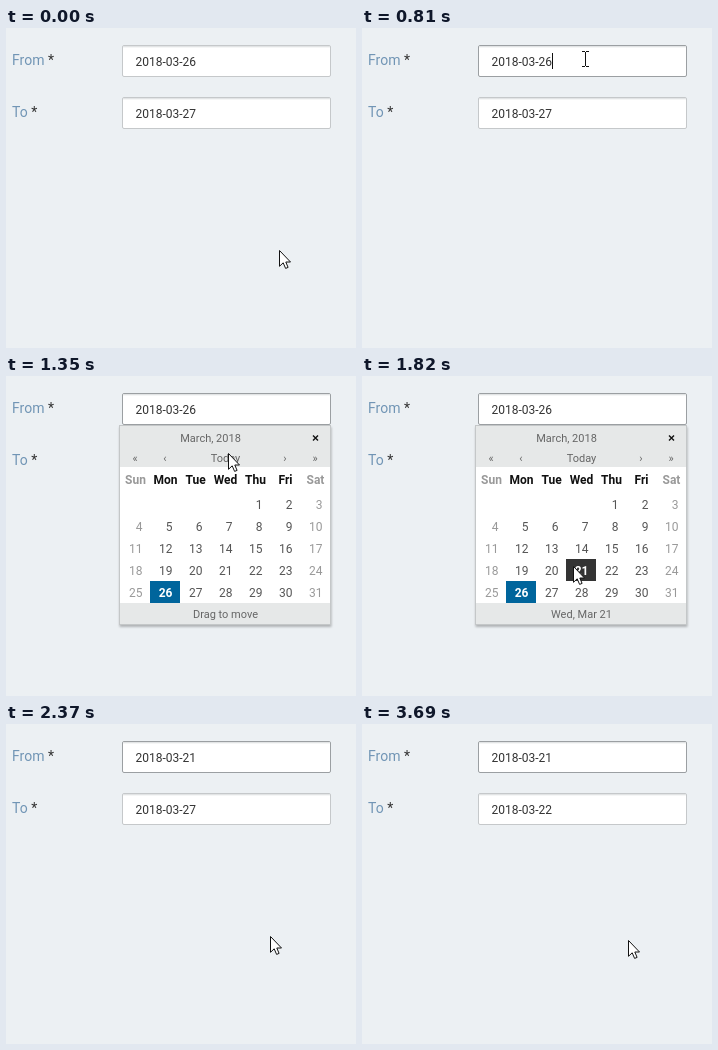
Animation of 350 by 320 pixels, one loop 5.69 s. Source, as an HTML page:

```html
<!DOCTYPE html>
<html lang="en">
<head>
<meta charset="utf-8">
<title>Date picker</title>
<style>
html, body { margin: 0; width: 100%; height: 100%; overflow: hidden; background: #ecf0f3; }
svg { display: block; }
text { font: 12px Roboto, sans-serif; fill: #333; white-space: pre; }
.label { font-size: 14px; fill: #7195b5; }
.label tspan { fill: #333; }
.small { font-size: 11px; fill: #666; }
.mid { text-anchor: middle; }
.day { text-anchor: end; fill: #555; }
.head { text-anchor: middle; font-weight: 700; fill: #111; }
.weekend { fill: #999; }
.picked { font-weight: 700; fill: #fff; }
.field { fill: #fff; stroke: #c5c8ca; }

/* every state holds until the next keyframe */
.anim { animation: 5690ms step-end infinite; }
.timed { opacity: 0; }
#pointer { animation-name: move; }
#arrow { animation-name: arrow; }
#beam { animation-name: beam; }
#from { animation-name: focus; }
#caret { animation-name: caret; }
#calendar { animation-name: open; }
#fromOld { animation-name: from-old; }
#fromNew { animation-name: from-new; }
#toOld { animation-name: to-old; }
#toNew { animation-name: to-new; }
#toShade { animation-name: flash; }
.hint { animation-name: hint; }
.tue { animation-name: tue; }
.wed { animation-name: wed; }

@keyframes move {
  0% { transform: translate(273px, 222px); }
  1.23% { transform: translate(264px, 192px); }
  2.28% { transform: translate(243px, 112px); }
  3.51% { transform: translate(229px, 46px); }
  4.74% { transform: translate(219px, 27px); }
  8.78% { transform: translate(225px, 38px); }
  10.01% { transform: translate(229px, 46px); }
  11.24% { transform: translate(223px, 31px); }
  18.45% { transform: translate(224px, 43px); }
  19.85% { transform: translate(224px, 56px); }
  21.08% { transform: translate(223px, 65px); }
  22.31% { transform: translate(222px, 73px); }
  23.72% { transform: translate(222px, 77px); }
  25.3% { transform: translate(214px, 125px); }
  26.53% { transform: translate(200px, 171px); }
  27.94% { transform: translate(207px, 193px); }
  29.34% { transform: translate(211px, 190px); }
  36.02% { transform: translate(248px, 206px); }
  37.6% { transform: translate(264px, 212px); }
  64.85%, 100% { transform: translate(266px, 216px); }
}
@keyframes arrow { 0%, 19.85%, 100% { opacity: 1; } 3.51% { opacity: 0; } }
@keyframes beam { 0%, 19.85%, 100% { opacity: 0; } 3.51% { opacity: 1; } }
@keyframes focus { 0% { stroke: #c5c8ca; } 14.23%, 100% { stroke: #9b9fa2; } }
@keyframes caret {
  0%, 22.31%, 31.98%, 41.65%, 60.8%, 100% { opacity: 0; }
  14.23%, 29.34%, 33.39%, 52.37% { opacity: 1; }
}
@keyframes open { 0%, 33.39%, 100% { opacity: 0; } 15.46% { opacity: 1; } }
@keyframes from-old { 0% { opacity: 1; } 33.39%, 100% { opacity: 0; } }
@keyframes from-new { 0% { opacity: 0; } 33.39%, 100% { opacity: 1; } }
@keyframes to-old { 0% { opacity: 1; } 51.31%, 100% { opacity: 0; } }
@keyframes to-new { 0% { opacity: 0; } 51.31%, 100% { opacity: 1; } }
@keyframes flash { 0%, 52.37%, 100% { opacity: 1; } 51.31% { opacity: 0; } }
@keyframes hint { 0% { opacity: 1; } 26.53%, 100% { opacity: 0; } }
@keyframes tue { 0%, 27.94%, 100% { opacity: 0; } 26.53% { opacity: 1; } }
@keyframes wed { 0%, 33.39%, 100% { opacity: 0; } 27.94% { opacity: 1; } }
</style>
</head>
<body>
<svg width="350" height="320" viewBox="0 0 350 320">
  <defs>
    <filter id="soft" x="-5%" y="-5%" width="110%" height="110%"><feGaussianBlur stdDeviation="1.2"/></filter>
    <g id="shade">
      <path d="M117 .5H324" stroke="#e2e4e5"/>
      <path d="M117 1.5H324" stroke="#f5f6f6"/>
    </g>
  </defs>
  <rect width="350" height="320" fill="#ecf0f3"/>

  <text class="label" x="6" y="37">From<tspan> *</tspan></text>
  <rect id="from" class="field anim" x="116.5" y="17.5" width="208" height="31" rx="1.5"/>
  <use href="#shade" y="18"/>
  <text id="fromOld" class="anim" x="129.5" y="38">2018-03-26</text>
  <text id="fromNew" class="anim timed" x="129.5" y="38">2018-03-21</text>
  <rect id="caret" class="anim timed" x="190" y="25" width="1" height="16" fill="#111"/>

  <text class="label" x="6" y="89">To<tspan> *</tspan></text>
  <rect class="field" x="116.5" y="69.5" width="208" height="31" rx="1.5"/>
  <use id="toShade" class="anim" href="#shade" y="70"/>
  <text id="toOld" class="anim" x="129.5" y="90">2018-03-27</text>
  <text id="toNew" class="anim timed" x="129.5" y="90">2018-03-22</text>

  <g id="calendar" class="anim timed">
    <rect x="113.5" y="51" width="212" height="200" fill="#000" opacity=".25" filter="url(#soft)"/>
    <rect x="113.5" y="49.5" width="211" height="199" fill="#fff" stroke="#c4c7c8"/>
    <rect x="114" y="50" width="210" height="41" fill="#e6e8e8"/>
    <rect x="114" y="227" width="210" height="21" fill="#e6e8e8"/>
    <text class="small mid" x="204.5" y="66">March, 2018</text>
    <path d="M307 59.5l5 5m0-5l-5 5" stroke="#111" stroke-width="1.4"/>
    <text class="small mid" x="129" y="86">«</text>
    <text class="small mid" x="159" y="86">‹</text>
    <text class="small mid" x="219.5" y="86">Today</text>
    <text class="small mid" x="279" y="86">›</text>
    <text class="small mid" x="309" y="86">»</text>
    <g id="days"></g>
    <text class="small mid anim hint" x="219.5" y="242">Drag to move</text>
    <text class="small mid anim timed tue" x="219.5" y="242">Tue, Mar 13</text>
    <text class="small mid anim timed wed" x="219.5" y="242">Wed, Mar 21</text>
  </g>

  <g id="pointer" class="anim">
    <path id="arrow" class="anim" d="M.5 .5V16.3L4.2 12.8 6.6 18.4 9.1 17.4 6.8 12H11.5Z" fill="#fff" stroke="#111"/>
    <path id="beam" class="anim timed" d="M-3 -7.5H0M1 -7.5H4M.5 -7V7M-3 7.5H0M1 7.5H4" fill="none" stroke="#111"/>
  </g>
</svg>
<script>
const days = document.getElementById('days');

function add(tag, attrs, content = '') {
  const el = document.createElementNS('http://www.w3.org/2000/svg', tag);
  for (const name in attrs) el.setAttribute(name, attrs[name]);
  el.textContent = content;
  days.append(el);
}

const isWeekend = col => col === 0 || col === 6;

// A filled cell with its number, drawn over the plain one
function mark(day, fill, cls) {
  const cell = day + 3;
  const x = 114 + cell % 7 * 30;
  const y = 117 + Math.floor(cell / 7) * 22;
  add('rect', { x, y, width: 30, height: 22, fill, class: cls });
  add('text', { x: x + 22.5, y: y + 15.5, class: 'day picked ' + cls }, day);
}

['Sun', 'Mon', 'Tue', 'Wed', 'Thu', 'Fri', 'Sat'].forEach((name, col) =>
  add('text', { x: 129.5 + col * 30, y: 108, class: 'head' + (isWeekend(col) ? ' weekend' : '') }, name));

for (let day = 1; day <= 31; day++) {
  const col = (day + 3) % 7, row = Math.floor((day + 3) / 7);
  add('text', {
    x: 136.5 + col * 30,
    y: 132.5 + row * 22,
    class: 'day' + (isWeekend(col) ? ' weekend' : '')
  }, day);
}

mark(26, '#00659c', '');
mark(13, '#333', 'anim timed tue');
mark(21, '#333', 'anim timed wed');
</script>
</body>
</html>
```
